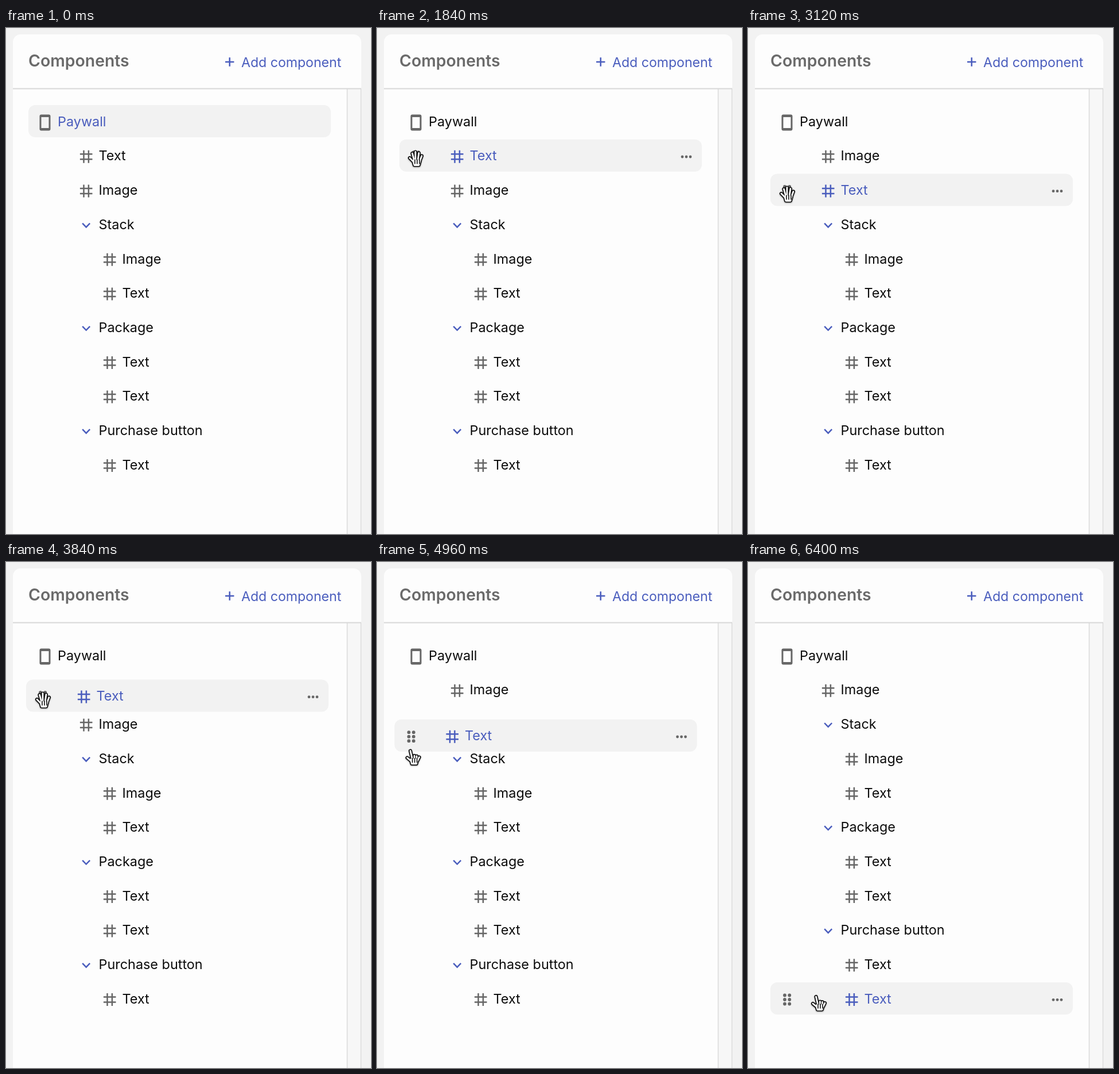
An HTML page that plays this animation: 636 px wide and 880 px high, repeating every 6560 ms.

```html
<!DOCTYPE html>
<html lang="en">
<head>
<meta charset="utf-8">
<title>Component tree</title>
<style>
  html, body { margin: 0; width: 100%; height: 100%; overflow: hidden; background: #f2f2f2; }
  svg { display: block; width: 100%; height: 100%; }
  text {
    font: 400 23.4px Inter, "Liberation Sans", sans-serif;
    font-optical-sizing: none;
    fill: currentColor;
  }
  .title { font-weight: 600; font-size: 28.4px; color: #6a6a6a; }
  .add { font-size: 23.1px; }
  .line { fill: none; stroke: currentColor; stroke-width: 2.5; }
  .gray { color: #666; }
  .blue, .on .icon, .on text { color: #4a5dbd; }
  .dots { fill: #666; }
  .row { color: #0c0c0c; }
  .cursor { filter: drop-shadow(0 1.5px 1.2px rgba(0, 0, 0, .35)); stroke-linejoin: round; stroke-linecap: round; }
  .edge { fill: #111; stroke: #111; stroke-width: 6.2; }
  .skin { fill: #fff; stroke: #fff; stroke-width: 2.8; }
  .crease { stroke: #111; stroke-width: 1.6; }
</style>
</head>
<body>
<svg viewBox="0 0 636 880">
  <defs>
    <clipPath id="list"><rect x="12" y="106" width="582" height="774"/></clipPath>
    <path id="hash" class="line" d="M-4.2-11V11M4.2-11V11M-10.8-4.5H10.8M-10.8 4.5H10.8"/>
    <path id="chevron" class="line" d="M-6.5-3.4L0 3.3L6.5-3.4"/>
    <path id="palm" d="M-5 4H7L5 11.5H-3Z"/>
    <path id="open" d="M-11-1L-5 5M-6.5-9L-3 4M-1-11.5V4M5-9.500L3 4M10-4.500L6 6"/>
    <path id="index" d="M-11 1L-5 6M-5.5-11L-2 4M1.500-2.500V5M5.500-1.800V5M10 0L7 6"/>
  </defs>

  <path d="M12 880V25a14 14 0 0 1 14-14H605a14 14 0 0 1 14 14V880Z" fill="#fdfdfd"/>
  <text class="title" x="39" y="67">Components</text>
  <g class="blue">
    <path class="line" d="M382 59H397.4M389.7 51.3V66.7"/>
    <text class="add" x="410" y="67.5">Add component</text>
  </g>

  <g clip-path="url(#list)">
    <g id="root" class="row">
      <rect id="rootBg" x="39" y="134" width="527" height="56" rx="12" fill="#f2f2f2"/>
      <rect x="60" y="152" width="16" height="25" rx="1.5" fill="none" stroke="#666" stroke-width="3"/>
      <path d="M60 153H76M60 176H76" stroke="#666" stroke-width="4"/>
      <text x="90" y="171">Paywall</text>
    </g>
    <g id="tree"></g>
  </g>

  <rect x="594" y="106" width="25" height="774" fill="#f7f7f7"/>
  <path d="M594.5 106V880M618.5 106V880" stroke="#dcdcdc" stroke-width="1.6"/>
  <path d="M12 105.5H619" stroke="#d8d8d8" stroke-width="1.8"/>

  <g id="cursor" class="cursor"></g>
</svg>

<script>
const LOOP = 6560, STEP = 80, PITCH = 59.7, TOP = 162 + PITCH;
const HOVER = 800, SELECT = 1200, NEST = 6000;

// Label and depth; a label followed by a deeper one is a group.
const items = [
  ["Image", 0], ["Stack", 0], ["Image", 1], ["Text", 1], ["Package", 0],
  ["Text", 1], ["Text", 1], ["Purchase button", 0], ["Text", 1]
];

// Cursor moves: start and end time, then where it comes to rest.
const entry = [420, 520];
const moves = [
  [320, 960, 180, 237],
  [1200, 1680, 68, 227],
  [1840, 2480, 79, 280],
  [2960, 3120, 69, 289],
  [3440, 3760, 65, 240],
  [3840, 4080, 67, 224],
  [4160, 4400, 68, 227],
  [4720, 4880, 59.5, 307],
  [4880, 5360, 115.5, 745],
  [5440, 5760, 115, 754],
  [6000, 6160, 124, 767]
];

// Times of grabbing and dropping the card.
const drags = [[1840, 2800], [3440, 4160], [4720, NEST]];

const $ = id => document.getElementById(id);
const move = (el, x, y) => el.setAttribute("transform", `translate(${x} ${y})`);
const show = (el, on) => el.setAttribute("visibility", on ? "visible" : "hidden");
const dot = (x, y, r) => `<circle cx="${x}" cy="${y}" r="${r}"/>`;
const clamp = (v, lo, hi) => Math.min(hi, Math.max(lo, v));
const smooth = k => k * k * (3 - 2 * k);
const slotOf = dy => clamp(Math.round(dy / PITCH), 0, items.length);

function addRow(html) {
  const g = document.createElementNS("http://www.w3.org/2000/svg", "g");
  g.setAttribute("class", "row");
  g.innerHTML = html;
  $("tree").append(g);
  return g;
}

// Row contents are placed around a vertical centre of 0.
function label(name, icon, tint) {
  return `<g class="icon ${tint}"><use href="#${icon}" x="139.7" y="2"/></g>
    <text x="161.5" y="8.7">${name}</text>`;
}

const rows = items.map(([name, depth], i) => {
  const group = i + 1 < items.length && items[i + 1][1] > depth;
  const body = label(name, group ? "chevron" : "hash", group ? "blue" : "gray");
  return addRow(`<g transform="translate(${depth * 41} 0)">${body}</g>`);
});

const grip = [-5.5, 2, 9.5].map(y => dot(64, y, 2.9) + dot(72.3, y, 2.9)).join("");
const more = [532, 539, 546].map(x => dot(x, 2.3, 2.4)).join("");
const card = addRow(`<g class="hover"><rect x="39" y="-28" width="527" height="56" rx="12" fill="#f2f2f2"/>
  <g class="dots">${grip}${more}</g></g><g class="label">${label("Text", "hash", "gray")}</g>`);
const cardHover = card.querySelector(".hover");
const cardLabel = card.querySelector(".label");

// A hand is its fingers and palm, drawn wide in black and then narrow in white.
const layer = fingers => ["edge", "skin"].map(name =>
  `<g class="${name}"><use href="#${fingers}"/><use href="#palm"/></g>`).join("");
$("cursor").innerHTML = ["open", "index"].map(kind =>
  `<g id="${kind}Hand">${layer(kind)}<path class="crease" d="M-2 2V9M2 2V9M6 2V9"/></g>`).join("");

function cursorAt(t) {
  let [x, y] = entry;
  for (const [from, to, toX, toY] of moves) {
    const k = smooth(clamp((t - from) / (to - from), 0, 1));
    x += (toX - x) * k;
    y += (toY - y) * k;
  }
  return [x, y];
}

// The dragged card trails the cursor by one step and drops into the nearest slot.
function cardAt(t) {
  let home = 0;
  for (const [from, to] of drags) {
    if (t < from) break;
    const [grabX, grabY] = cursorAt(from);
    const [x, y] = cursorAt(clamp(t - STEP, from, to));
    const dy = home + y - grabY;
    if (t < to) return [x - grabX, dy];
    const [, dropY] = cursorAt(to);
    home = slotOf(home + dropY - grabY) * PITCH;
  }
  return [0, home];
}

function draw(t) {
  const [cx, cy] = cursorAt(t);
  const [dx, dy] = cardAt(t);
  const slot = slotOf(dy);

  rows.forEach((row, i) => move(row, 0, TOP + PITCH * (i + (i >= slot))));
  move(card, dx, TOP + dy);
  move(cardLabel, t >= NEST ? 41 : 0, 0);
  show(cardHover, t >= HOVER);

  const picked = t >= SELECT;
  card.classList.toggle("on", picked);
  $("root").classList.toggle("on", !picked);
  show($("rootBg"), !picked);

  const onGrip = Math.abs(cx - 68 - dx) < 18 && Math.abs(cy - TOP - dy - 5) < 20;
  const seen = t >= moves[0][0];
  move($("cursor"), cx, cy);
  show($("openHand"), seen && onGrip);
  show($("indexHand"), seen && !onGrip);
}

const begin = performance.now();
function frame() {
  const t = (performance.now() - begin) % LOOP;
  draw(Math.floor(t / STEP) * STEP);
  requestAnimationFrame(frame);
}
frame();
</script>
</body>
</html>
```
